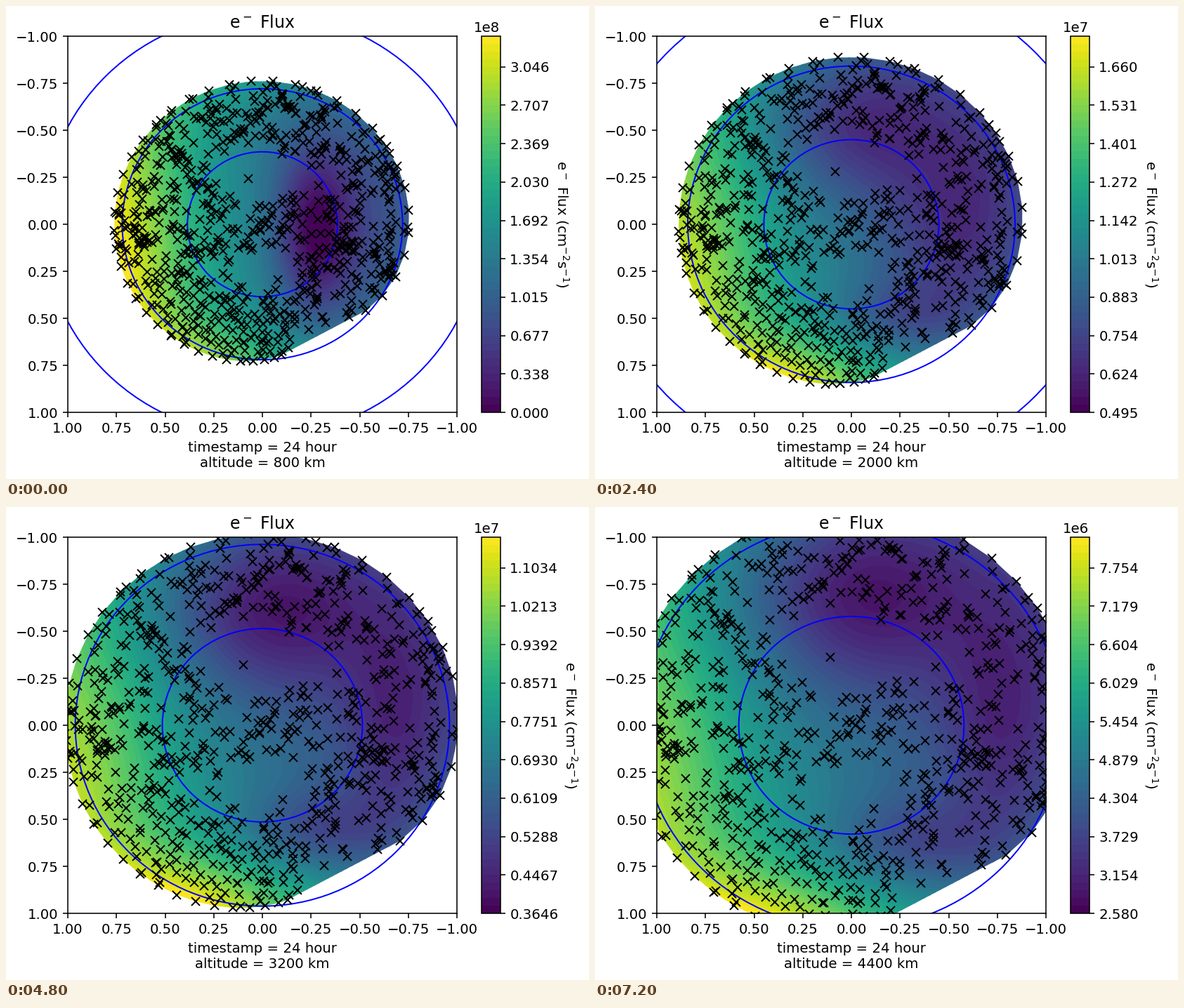
A matplotlib script for the animation above (8000 ms loop, 830 by 674 pixels).

```python
import numpy as np
import matplotlib.pyplot as plt
from matplotlib.animation import FuncAnimation
from matplotlib.path import Path

W, H, DPI = 830, 674, 142
EARTH = 6371
ALTITUDES = np.arange(800, 4401, 400)

# Altitude, flux at the lowest and at the highest labelled colorbar tick
TICKS = np.array([
    (800, 0, 3.0457e8), (1600, .139e7, 2.038e7), (2000, .495e7, 1.660e7),
    (2400, .46553e7, 1.43252e7), (3200, .3646e7, 1.10342e7),
    (3600, 3.238e6, 9.7656e6), (4400, 2.5796e6, 7.7535e6)]).T


def polar(r, degrees):
    """Map position; degrees run clockwise from the right."""
    a = np.radians(degrees)
    return np.c_[-r * np.cos(a), r * np.sin(a)]


def coverage_rim():
    """Nearly a circle, dented towards a straight gap at the lower right."""
    start, sweep = 82, 319
    turn = sweep * np.linspace(0, 1, 43) ** 1.25
    from_gap = np.minimum(turn, sweep - turn)
    return polar(.762 - .06 * np.exp(-from_gap / 20), start + turn)


def keep_chance(pts):
    """How likely a random sample survives at each place."""
    x, y = pts.T
    r, angle = np.hypot(x, y), np.degrees(np.arctan2(y, -x))
    p = np.ones(len(pts))
    p[(angle > 75) & (angle < 160) & (r > .45)] = .3
    p[(angle > 42) & (angle < 82) & (r > .52)] = .6
    p[np.hypot((x - .015) / .27, (y + .27) / .14) < 1] = .07
    p[np.hypot(x / .17, (y - .25) / .1) < 1] = .07
    return p


def sample_points(rim):
    rng = np.random.default_rng(4)
    cloud = rng.uniform(-.8, .8, (1180, 2))
    cloud = cloud[Path(rim).contains_points(cloud)]
    cloud = cloud[rng.random(len(cloud)) < keep_chance(cloud)]
    parts = [rim, cloud]
    # Satellite tracks: loose rows along the lower left rim
    for r in np.linspace(.48, .68, 5):
        row = polar(r, np.arange(78, 158, 2.6 / r))
        parts.append(row + rng.normal(0, .009, row.shape))
    for clump in [(.6, .1), (-.43, .12), (-.14, -.61)]:
        parts.append(rng.normal(clump, .025, (9, 2)))
    return np.vstack(parts)


def blob(x, y, sx, sy):
    return np.exp(-((gx - x) / sx) ** 2 - ((gy - y) / sy) ** 2)


gx, gy = np.meshgrid(np.linspace(-.8, .8, 150), np.linspace(-.8, .8, 150))
rim = coverage_rim()
points = sample_points(rim)

edge = (np.hypot(gx, gy) / .72) ** 4
left = blob(.68, .12, .35, .6)
bottom = blob(.3, .78, .45, .25)
low_field = (.42 + .35 * gx + .05 * gy + .11 * edge + .2 * left + .18 * bottom
             - .34 * blob(-.27, .04, .2, .42))
high_field = (.36 + .3 * gx + .15 * gy + .08 * edge + .2 * left + .4 * bottom
              - .24 * blob(0, -.45, .38, .32)
              - .13 * blob(-.5, .02, .18, .4)
              - .17 * blob(-.2, .42, .3, .16))


def relative_flux(alt):
    """Slide from the low-orbit pattern to the high-orbit one."""
    mix = 1 / (1 + np.exp((1800 - alt) / 140))
    return np.clip(low_field + mix * (high_field - low_field), .001, .999)


def flux_levels(alt):
    low = np.interp(alt, TICKS[0], TICKS[1])
    top_tick = np.exp(np.interp(alt, TICKS[0], np.log(TICKS[2])))
    return np.linspace(low, low + (top_tick - low) * 49 / 45, 50)


def box(left, right, top=43, bottom=579):
    return [left / W, 1 - bottom / H, (right - left) / W, (bottom - top) / H]


fig = plt.figure(figsize=((W + .01) / DPI, (H + .01) / DPI), dpi=DPI, facecolor='white')


def draw(i):
    fig.clf()
    ax = fig.add_axes(box(88, 642))
    cax = fig.add_axes(box(676.5, 703.5))
    alt = ALTITUDES[i]
    scale = (EARTH + alt) / (EARTH + ALTITUDES[0])
    levels = flux_levels(alt)
    flux = levels[0] + (levels[-1] - levels[0]) * relative_flux(alt)

    cs = ax.contourf(gx * scale, gy * scale, flux, levels=levels, cmap='viridis')
    cs.set_clip_path(Path(rim * scale), ax.transData)
    for r in (.3853, .7205, 1.126):
        ax.add_patch(plt.Circle((0, 0), r * scale, color='b', fill=False))
    ax.plot(*(points * scale).T, 'kx')

    ticks = np.linspace(-1, 1, 9)
    ax.set(xlim=(1, -1), ylim=(1, -1), xticks=ticks, yticks=ticks,
           title='e$^-$ Flux',
           xlabel=f'timestamp = 24 hour\naltitude = {alt} km')
    bar = fig.colorbar(cs, cax=cax)
    bar.set_label('e$^-$ Flux (cm$^{-2}$s$^{-1}$)', rotation=270, labelpad=15)
    return []


anim = FuncAnimation(fig, draw, frames=len(ALTITUDES), init_func=lambda: draw(0),
                     interval=800, repeat=True, repeat_delay=0)
plt.show()
```
